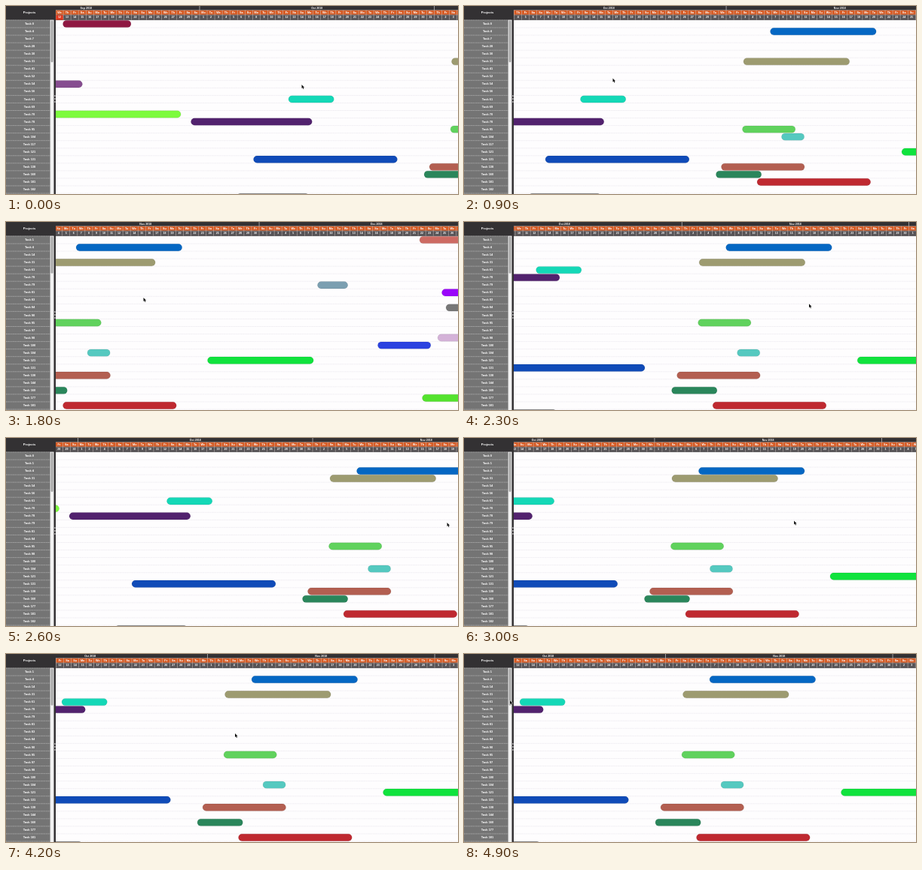
Animation, 600 px wide and 251 px high, one loop 5000 ms. Source, as an HTML page with a canvas:

```html
<!DOCTYPE html>
<html lang="en">
<head>
<meta charset="utf-8">
<title>Project timeline</title>
<style>
html, body { margin: 0; width: 100%; height: 100%; overflow: hidden; background: #fff; }
canvas { display: block; width: 600px; height: 251px; }
</style>
</head>
<body>
<canvas id="stage"></canvas>
<script>
const W = 600, H = 251, LOOP = 5000, STEP = 100;
const LEFT = 66, DAY = 10.05, TOP = 18.9, ROW = 10.05, PAGE = 260;
const DARK = '#333133', ORANGE = '#d75c25';
const canvas = document.getElementById('stage'), c = canvas.getContext('2d');
const dpr = window.devicePixelRatio || 1;
canvas.width = W * dpr;
canvas.height = H * dpr;

// Task number, start in px at zero scroll, length in days, colour
const tasks = [
  [0, 75.5, 9, '#8f1842'], [1, 1083, 10, '#cd6b63'], [4, 627, 14, '#0567c3'],
  [31, 591.5, 14, '#9d9b70'], [54, 21, 8, '#864d90'], [61, 375, 6, '#14d8b7'],
  [70, 11, 22, '#7dfb3e'], [78, 245.5, 16, '#52226e'], [79, 947.5, 4, '#7b9fb1'],
  [81, 1112.5, 9, '#9a05fa'], [95, 590, 7, '#60d25d'], [98, 1107, 9, '#d4b2d8'],
  [100, 1027.5, 7, '#2b42e0'], [104, 642, 3, '#55c9c0'], [121, 801.5, 14, '#10e33d'],
  [131, 328.5, 19, '#104bb8'], [138, 562, 11, '#b35f51'], [160, 555, 6, '#2a865b'],
  [177, 1086.5, 11, '#54e32e'], [181, 609.5, 15, '#bf2930'], [185, 306, 9.6, '#777777']
].map(([id, start, days, color]) => ({ id, start, end: start + days * DAY, color }));

// Tasks that lie outside every visible range but still hold a row
const hidden = (start, ...ids) => ids.forEach(id => tasks.push({ id, start, end: start + 3 * DAY, color: '#777' }));
hidden(-60, 7, 28, 30, 41, 52, 69, 117);
hidden(30, 56, 182);
hidden(1118, 84);
hidden(1200, 14, 83, 90, 97, 144);
tasks.sort((a, b) => a.id - b.id);

// Time, pointer x, pointer y, scroll
const keys = [
  [0, 392.5, 105, 0], [900, 197.5, 96.5, 220.5], [1800, 182.5, 101, 534],
  [2600, 585.5, 113, 161.5], [3500, 232, 107, 531], [4200, 304, 106, 301],
  [4900, 61, 62, 301], [LOOP, 61, 62, 301]
];

function pose(t) {
  const i = keys.findIndex(k => k[0] > t), a = keys[i - 1], b = keys[i];
  const u = (t - a[0]) / (b[0] - a[0]), e = u * u * (3 - 2 * u);
  return [1, 2, 3].map(n => a[n] + (b[n] - a[n]) * e);
}

// Rows reload whenever the view is a full page away from the loaded place
function loadedAt(t) {
  let place = 0;
  for (let s = 0; s <= t; s += STEP) {
    place += Math.trunc((pose(s)[2] - place) / PAGE) * PAGE;
  }
  return place;
}

function rect(x, y, w, h, color) {
  c.fillStyle = color;
  c.fillRect(x, y, w, h);
}

function pill(x, y, w, h, color) {
  c.beginPath();
  c.roundRect(x, y, w, h, Math.min(w, h) / 2);
  c.fillStyle = color;
  c.fill();
}

function text(s, x, y, size) {
  c.font = `bold ${size}px "Liberation Sans", Arial, sans-serif`;
  c.fillStyle = '#fff';
  c.fillText(s, x, y);
}

function dashes(x, y, end, color) {
  c.strokeStyle = color;
  c.lineWidth = 0.6;
  c.setLineDash([1.5, 0.8]);
  c.beginPath();
  c.moveTo(x, y);
  c.lineTo(end, y);
  c.stroke();
  c.setLineDash([]);
}

function drawBar({ start, end, color }, y, scroll) {
  pill(start - scroll, y + 0.3, end - start, 9.4, color);
  c.strokeStyle = 'rgba(0,0,0,.15)';
  c.lineWidth = 0.5;
  c.stroke();
}

function drawHeader(scroll) {
  const xOf = d => LEFT + d * DAY - scroll;
  const dateOf = d => new Date(2018, 8, 12 + d);
  rect(LEFT, 0, W, 18.6, DARK);
  rect(LEFT, 5.6, W, 6.1, ORANGE);
  rect(LEFT, 12, W, 6.6, '#565356');
  rect(LEFT, 5.2, W, 0.5, '#b9b0ac');
  rect(LEFT, 11.7, W, 0.5, '#b9b0ac');
  for (let d = Math.floor(scroll / DAY); xOf(d) < W; d++) {
    const x = xOf(d), day = dateOf(d).toLocaleDateString('en-US', { weekday: 'short' });
    if (d === 0) rect(x, 12.2, DAY, 6.4, '#e0371c');
    rect(x - 0.25, 5.4, 0.5, 13.2, '#c8bdb8');
    text(day.slice(0, 2), x + DAY / 2, 8.8, 3.8);
    text(dateOf(d).getDate(), x + DAY / 2, 15.3, 3.6);
  }
  ['Sep', 'Oct', 'Nov', 'Dec'].forEach((name, i) => {
    const first = Math.round((new Date(2018, 8 + i, 1) - dateOf(0)) / 864e5);
    const days = new Date(2018, 9 + i, 0).getDate();
    rect(xOf(first) - 0.25, 0, 0.6, 5.4, '#ddd');
    text(name + ' 2018', xOf(first + days / 2), 2.7, 3.6);
  });
}

function drawPanel(rows, place) {
  rect(0, 0, LEFT, H, DARK);
  text('Projects', 31, 8.5, 4.2);
  rect(0, TOP - 0.4, 58.5, H, '#747474');
  rows.forEach((task, i) => {
    const y = TOP + i * ROW;
    dashes(0, y, 58.5, '#c9c9c9');
    text('Task ' + task.id, 31, y + 5, 4);
  });
  rect(58.5, TOP - 0.4, 5, H, '#f2f2f2');
  pill(59.6, 19.2, 2.9, 56 - place / 80, '#a6a6a6');
  for (let y = 120; y < 130; y += 4) pill(64.1, y - 0.8, 1.6, 1.6, '#fff');
}

function drawPointer(x, y) {
  const shape = [[0, 0], [0, 5.1], [1.2, 4.1], [2, 6], [2.9, 5.6], [2.1, 3.8], [3.6, 3.7]];
  c.beginPath();
  shape.forEach(([dx, dy]) => c.lineTo(x + dx, y + dy));
  c.closePath();
  c.strokeStyle = '#fff';
  c.lineWidth = 0.8;
  c.stroke();
  c.fillStyle = '#111';
  c.fill();
}

function draw(t) {
  const [px, py, scroll] = pose(t), place = loadedAt(t);
  const rows = tasks.filter(k => k.end > place - 220 && k.start < place + W + PAGE);
  c.setTransform(dpr, 0, 0, dpr, 0, 0);
  c.textAlign = 'center';
  c.textBaseline = 'middle';
  rect(0, 0, W, H, '#fefdfe');
  c.save();
  c.beginPath();
  c.rect(LEFT, 0, W - LEFT, H);
  c.clip();
  rows.forEach((task, i) => {
    const y = TOP + i * ROW;
    dashes(LEFT, y + ROW, W, '#e2dfe8');
    drawBar(task, y, scroll);
  });
  drawHeader(scroll);
  c.restore();
  drawPanel(rows, place);
  drawPointer(px, py);
}

function tick() {
  const t = performance.now() % LOOP;
  draw(Math.floor(t / STEP) * STEP);
  requestAnimationFrame(tick);
}
tick();
</script>
</body>
</html>
```
